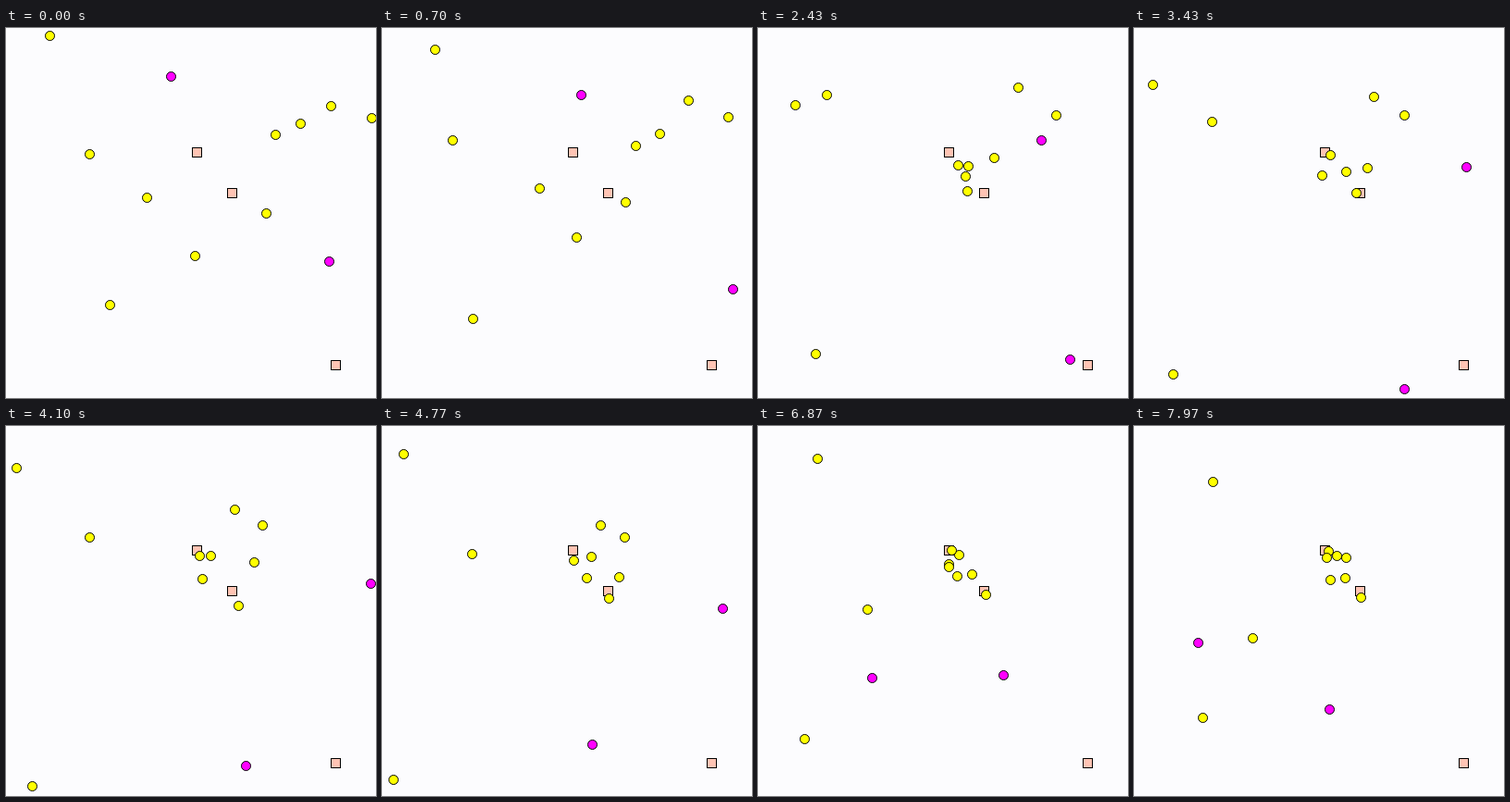
Animation, 400 px wide and 400 px high, one loop 8 s. Source, as an HTML page with a canvas:

```html
<!DOCTYPE html>
<html lang="en">
<head>
<meta charset="utf-8">
<title>Swarm</title>
<style>
  html, body { margin: 0; width: 100%; height: 100%; overflow: hidden; background: #fcfcfe; }
  canvas { display: block; }
</style>
</head>
<body>
<canvas id="stage" width="400" height="400"></canvas>
<script>
const ctx = document.getElementById('stage').getContext('2d');
const SIZE = 400, MARGIN = 10, LOOP = 8000, FPS = 30, STEPS = 240, SUB = 10;
const PAPER = '#fcfcfe', PINK = '#ffc4b4', MAGENTA = '#f0f', YELLOW = '#ff0';

const outward = (pos, v) => (pos < MARGIN && v < 0) || (pos > SIZE - MARGIN && v > 0);

// Walks straight; near a wall it turns steadily to its next heading (degrees).
function roam(x, y, headings, speed, turn) {
  const track = [];
  let angle = headings[0], goal = 0;
  for (let i = 0; i < STEPS * SUB; i++) {
    if (i % SUB === 0) track.push([x, y]);
    const vx = speed * Math.cos(angle * Math.PI / 180);
    const vy = speed * Math.sin(angle * Math.PI / 180);
    const left = headings[goal] - angle;
    if (left) angle += Math.sign(left) * Math.min(Math.abs(left), turn / SUB);
    else if (goal < headings.length - 1 && (outward(x, vx) || outward(y, vy))) goal++;
    x += vx / SUB;
    y += vy / SUB;
  }
  return track;
}

// Visits the points one pixel per step, then shuttles between the last two.
function gather(...points) {
  const track = [];
  let [x, y] = points[0], next = 1;
  for (let i = 0; i < STEPS * SUB; i++) {
    if (i % SUB === 0) track.push([x, y]);
    const dx = points[next][0] - x, dy = points[next][1] - y;
    const dist = Math.hypot(dx, dy), step = Math.min(1 / SUB, dist);
    if (dist > 0) {
      x += dx / dist * step;
      y += dy / dist * step;
    }
    if (dist <= 1 / SUB) next = next < points.length - 1 ? next + 1 : next - 1;
  }
  return track;
}

const hunter = (x, y, ...headings) => ({ color: MAGENTA, track: roam(x, y, headings, 2, 14) });
const loner = (x, y, ...headings) => ({ color: YELLOW, track: roam(x, y, headings, 1, 20) });
const mate = (...points) => ({ color: YELLOW, track: gather(...points) });

const agents = [
  hunter(178, 52, 28.4, 145.2),
  hunter(349, 252, 45, 135, 214.9),
  loner(47, 8, -45, 70.8),
  loner(90, 136, 227, 308.6, 410),
  loner(112, 299, 133, 216, 316.5),
  mate([152, 183], [228, 142], [207, 136], [233, 143]),
  mate([204, 246], [230, 164], [254, 198], [200, 121]),
  mate([281, 200], [222, 161], [269, 145], [252, 168], [238, 201]),
  mate([291, 115], [285, 122], [202, 161], [211, 133]),
  mate([318, 103], [207, 168], [232, 160]),
  mate([351, 84], [268, 60], [203, 155], [225, 135]),
  mate([395, 97], [293, 93], [212, 165], [234, 163])
];
const squares = [[206, 134], [244, 178], [356, 364]];

function square([x, y]) {
  ctx.fillStyle = PINK;
  ctx.fillRect(x - 4.5, y - 4.5, 10, 10);
  ctx.strokeRect(x - 4.5, y - 4.5, 10, 10);
}

function disc([x, y], color) {
  ctx.fillStyle = color;
  ctx.beginPath();
  ctx.arc(Math.round(x) + 0.5, Math.round(y) + 0.5, 5, 0, Math.PI * 2);
  ctx.fill();
  ctx.stroke();
}

function draw(step) {
  ctx.fillStyle = PAPER;
  ctx.fillRect(0, 0, SIZE, SIZE);
  ctx.strokeStyle = '#000';
  ctx.lineWidth = 1;
  squares.forEach(square);
  for (const { color, track } of agents) disc(track[step], color);
}

const start = performance.now();
function tick() {
  const ms = (performance.now() - start) % LOOP;
  // Steps fall on times rounded to 10 ms, hence the small lead.
  draw(Math.min(STEPS - 1, Math.floor((ms + 3.4) * FPS / 1000)));
  requestAnimationFrame(tick);
}
tick();
</script>
</body>
</html>
```
